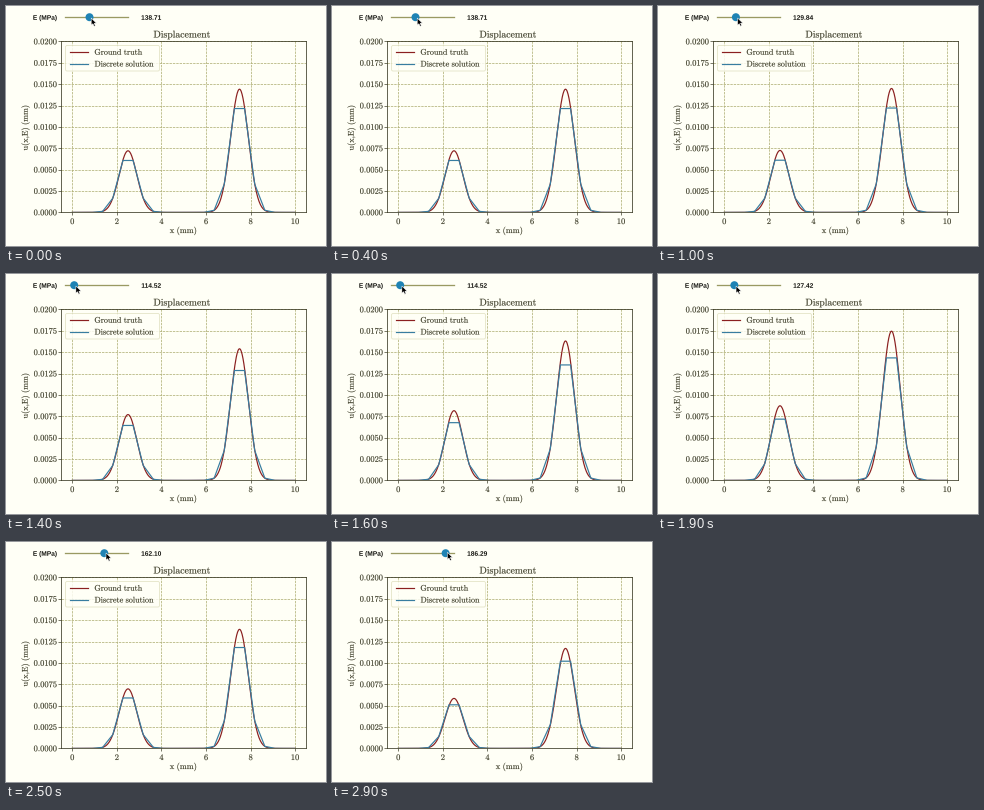
Animation, 320 px wide and 240 px high, one loop 3000 ms. Source, as a matplotlib script:

```python
import numpy as np
import matplotlib.pyplot as plt
from matplotlib.animation import FuncAnimation
from matplotlib.patches import Circle, FancyBboxPatch, PathPatch, Polygon
from matplotlib.textpath import TextPath
from matplotlib.transforms import Affine2D

W, H, DPI = 320, 240, 72          # at 72 dpi one point is one pixel
FRAMES, INTERVAL = 30, 100

PAPER, INK, GRID = "#fffff6", "#33331e", "#b0b076"
RED, BLUE, KNOB, TRACK = "#8b2020", "#387da0", "#1f83b4", "#9a9a62"

plt.rcParams["mathtext.fontset"] = "cm"
SANS = {"family": "Liberation Sans", "weight": "bold"}

# Slider steps over time; the plot follows the slider with a delay.
SLIDER_KEYS = ([0, 5, 10, 14, 16, 19, 22, 29],
               [48, 48, 37, 18, 18, 34, 54, 107])
PLOT_KEYS = ([0, 9, 10, 14, 18, 19, 22, 25, 29],
             [48, 48, 47, 37, 18, 18, 34, 54, 88])
TRACK_X0, TRACK_X1, TRACK_Y = 59, 122.3, 11.2
STEPS = 124


def modulus(keys, frame):
    return 100 + 100 * round(float(np.interp(frame, *keys))) / STEPS


def displacement(x, e):
    return (np.exp(-np.pi * (x - 2.5) ** 2)
            + 2 * np.exp(-np.pi * (x - 7.5) ** 2)) / e


def discrete_gain(e):
    # the coarse solution is affine in 1/e
    return 0.843 + 0.00107 * e


def roman(text):
    return r"$\mathrm{%s}$" % text.replace(" ", r"\ ").replace(",", "{,}")


def outline(x, y, text, size, ha="center", angle=0, prop=None):
    """Text as a path with its baseline at pixel y."""
    path = TextPath((0, 0), text, size=size, prop=prop)
    box = path.get_extents()
    anchor = {"left": box.x0, "center": (box.x0 + box.x1) / 2, "right": box.x1}[ha]
    place = (Affine2D().translate(-anchor, 0).scale(1, -1)
             .rotate_deg(-angle).translate(x, y))
    return place.transform_path(path)


fig = plt.figure(figsize=(W / DPI, H / DPI), dpi=DPI, facecolor=PAPER)

# Plot
left, right, top, bottom = 55.1, 300.4, 35.5, 206.4
ax = fig.add_axes([left / W, 1 - bottom / H, (right - left) / W, (bottom - top) / H],
                  facecolor=PAPER)
ax.set_xlim(-0.5, 10.5)
ax.set_ylim(0, 0.02)
xticks = np.arange(0, 11, 2)
yticks = np.arange(9) * 0.0025
ax.set_xticks(xticks)
ax.set_yticks(yticks)
ax.tick_params(length=2.8, width=0.65, color=INK,
               labelbottom=False, labelleft=False)
ax.grid(color=GRID, lw=0.75, ls=(0, (3.2, 1.3)))
ax.set_axisbelow(True)
for spine in ax.spines.values():
    spine.set(color=INK, linewidth=0.75)

x_fine = np.linspace(0, 10, 500)
x_mesh = np.linspace(0, 10, 23)
truth, = ax.plot([], [], color=RED, lw=1.2)
discrete, = ax.plot([], [], color=BLUE, lw=1.2)

# Overlay in pixel coordinates
ui = fig.add_axes([0, 0, 1, 1])
ui.set_xlim(0, W)
ui.set_ylim(H, 0)
ui.axis("off")


def label(x, y, text, size=8.2, **kw):
    ui.add_patch(PathPatch(outline(x, y, roman(text), size, **kw),
                           fc=INK, ec=INK, lw=0.12, zorder=3))


label(175.8, 31.5, "Displacement", 9.7)
label(177, 227, "x (mm)", 8.3)
label(21.6, 122, "u(x,E) (mm)", angle=90)
for v in xticks:
    label(left + (v + 0.5) / 11 * (right - left), 218, f"{v}", 8.4)
for v in yticks:
    label(50.6, bottom - v / 0.02 * (bottom - top) + 2.8, f"{v:.4f}", 8.4, ha="right")

# Legend
ui.add_patch(FancyBboxPatch((60.5, 40.5), 92, 23.5,
                            boxstyle="round,pad=1,rounding_size=1.6",
                            fc=PAPER, ec="#dedebc", lw=0.8, alpha=0.85))
for y, color, name in ((46, RED, "Ground truth"), (57.8, BLUE, "Discrete solution")):
    ui.plot([64, 82], [y, y], color=color, lw=1.2)
    label(88.8, y + 2.7, name, 8.1, ha="left")

# Slider
ui.add_patch(PathPatch(outline(27.3, 13.8, "E (MPa)", 6.6, "left", prop=SANS),
                       fc="#151510", ec="none"))
value = ui.add_patch(PathPatch(outline(0, 0, "0", 6.6), fc="#151510", ec="none"))
ui.plot([TRACK_X0, TRACK_X1], [TRACK_Y] * 2, color=TRACK, lw=1.3)
knob = ui.add_patch(Circle((0, 0), 4, fc=KNOB, ec="none", zorder=4))
ARROW = np.array([(0, 0), (0, 7.2), (1.7, 5.7), (2.9, 8.3),
                  (4.1, 7.7), (3, 5.2), (5.2, 5.1)])
cursor = ui.add_patch(Polygon(ARROW, fc="black", ec="white", lw=0.5, zorder=5))


def update(frame):
    e = modulus(PLOT_KEYS, frame)
    truth.set_data(x_fine, displacement(x_fine, e))
    discrete.set_data(x_mesh, discrete_gain(e) * displacement(x_mesh, e))

    e = modulus(SLIDER_KEYS, frame)
    x = TRACK_X0 + (TRACK_X1 - TRACK_X0) * (e - 100) / 100
    knob.center = x, TRACK_Y
    tip = x + 1.7, np.interp(frame, [0, 19, 29], [12, 12, 10.3])
    cursor.set_xy(ARROW + tip)
    value.set_path(outline(145.3, 13.8, f"{e:.2f}", 6.6, prop=SANS))
    return truth, discrete, knob, cursor, value


anim = FuncAnimation(fig, update, frames=FRAMES, interval=INTERVAL, repeat=True)
plt.show()
```
